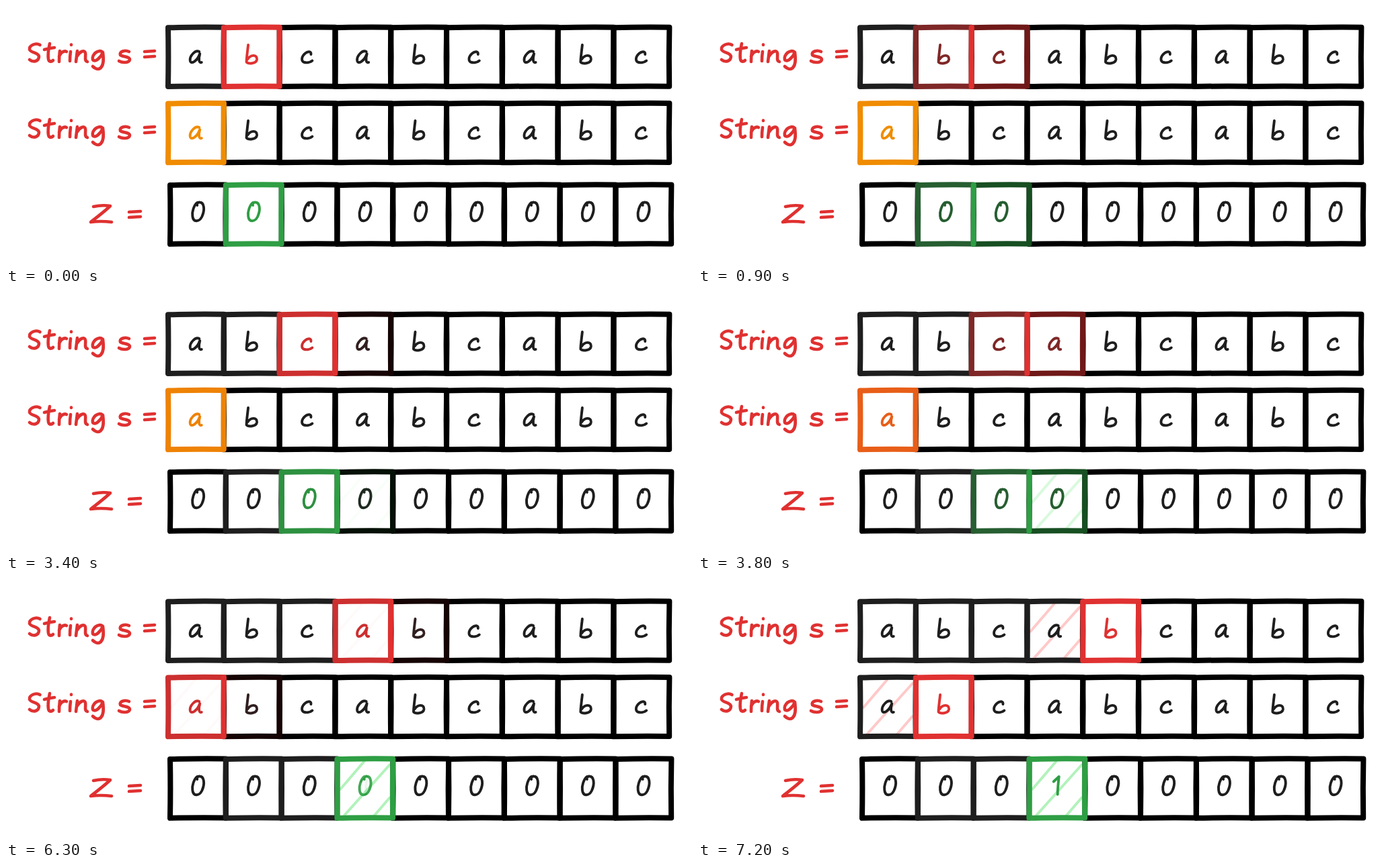
Write an HTML page that moves like this. It is 1020 px wide and 386 px high and loops after 8 s.

```html
<!DOCTYPE html>
<html lang="en">
<head>
<meta charset="utf-8">
<title>Z array step by step</title>
<style>
  html, body { margin: 0; width: 100%; height: 100%; overflow: hidden; background: #fff; }
  svg { display: block; width: 1020px; height: 386px; }
  path { fill: none; stroke-linecap: round; stroke-linejoin: round; }
  text { fill: none; font: 28px "Open Sans", sans-serif; text-anchor: middle; }
</style>
</head>
<body>
<svg id="stage" viewBox="0 0 1020 386"></svg>
<script>
const LOOP = 8000, PITCH = 82.8;
const RED = '#e03131', ORANGE = '#f08c00', GREEN = '#2f9e44';
const BLACK = '#000', GREY = '#1e1e1e', PINK = '#ffc9c9', MINT = '#b2f2bb';

// Handwritten glyphs as pen strokes around the cell's centre.
const GLYPHS = {
  a: 'M5-7.5C-1-10.5-9.5-1-8.5 6C-7.5 12 2 7 6-4.5C4 3 4 10 8.5 8.5',
  b: 'M-5-17.5C-6-8-7.5 2-7.5 8C-5 11 7 11 8 4C8.5-3-1-4-6 4',
  c: 'M5.5-3.5C6.5-8 1-8.5-3-5C-9 0-9.5 7-4 8.5C0 9.5 5 8 7.5 6',
  0: 'M-1-13C-6-9-9 1-8 7C-7 17 2 16 6 8C11-3 9-13 3-13.5C0-14-2-11-1-9',
  1: 'M-5-5.5L3-13C2-4 1 5 1 13.5'
};
const WORD = 'M50.5 59C44 55 34 60 35 66C37 71 48 70 49 76C49 83 41 86 35 81' +
  'M65 57C63 66 62 74 63 80C64 85 68 84 70 82M57 66Q64 64 72 63' +
  'M80 68Q79 76 79 84M79 76C82 70 86 67 90 69' +
  'M96 69Q95 76 95 83M97 58.5L97 59' +
  'M106 68Q105 76 104 84M105 77C110 68 117 66 118 71C119 76 116 83 121 84' +
  'M144 70C137 64 127 74 129 81C132 86 141 78 144 70C145 78 146 88 141 93C137 97 132 94 129 91' +
  'M183 69C177 66 168 69 170 74C173 77 184 76 184 81C183 86 173 86 168 83' +
  'M206 69L221 68M206 77L221 76';
const Z_WORD = 'M130 299Q143 296 155 298C148 305 135 315 126 322Q141 320 157 322' +
  'M183 307L200 306M183 315L200 314';
const BOX = 'M0 .5Q40-.5 83 0Q82 44 82.8 88Q40 87.5 0 88.3Q.8 44 0 .5Z';
const HATCH = 'M5 45L40 4M10 85L78 9M54 86L78 58';

const pen = (d, x, y, color, width) =>
  `<path d="${d}" transform="translate(${x} ${y})" stroke="${color}" stroke-width="${width}"/>`;

const label = (words, d, y, x, baseline) =>
  `<text x="${x}" y="${baseline}">${words}</text>` + pen(d, 0, y, RED, 4.6);

function row(x0, y0, midY, chars, { on, ink, past = [], hatch = {} }) {
  const rank = i => i === on ? 2 : past.includes(i) ? 1 : 0;
  const left = i => x0 + PITCH * i;
  const cells = [...chars].map((char, i) => ({ char, i, rank: rank(i) }));
  const hatches = Object.entries(hatch).map(([i, color]) => pen(HATCH, left(+i), y0, color, 4));
  const boxes = [...cells].sort((p, q) => p.rank - q.rank)
    .map(({ i, rank }) => pen(BOX, left(i), y0, [BLACK, GREY, ink][rank], 8));
  const glyphs = cells.map(({ char, i, rank }) => {
    const x = left(i) + 41.3;
    return `<text x="${x}" y="${midY + 10}">${char}</text>` +
      pen(GLYPHS[char], x, midY, rank === 2 ? ink : GREY, 3.9);
  });
  return [...hatches, ...boxes, ...glyphs].join('');
}

const scene = ({ top, mid, z, counts = '000000000' }) =>
  '<rect width="1020" height="386" fill="#fff"/>' +
  label('String s =', WORD, -1, 128, 83) +
  label('String s =', WORD, 112, 128, 196) +
  label('Z =', Z_WORD, 0, 162, 322) +
  row(241, 31.7, 75.5, 'abcabcabc', top) +
  row(241, 145, 188.5, 'abcabcabc', mid) +
  row(244, 266.5, 306, counts, z);

const scenes = [
  { start: 0,
    top: { on: 1, ink: RED, past: [0] },
    mid: { on: 0, ink: ORANGE },
    z: { on: 1, ink: GREEN } },
  { start: 500,
    top: { on: 2, ink: RED, past: [0, 1] },
    mid: { on: 0, ink: ORANGE },
    z: { on: 2, ink: GREEN, past: [1] } },
  { start: 3400,
    top: { on: 3, ink: RED, past: [0, 1, 2] },
    mid: { on: 0, ink: RED },
    z: { on: 3, ink: GREEN, past: [1, 2], hatch: { 3: MINT } } },
  { start: 6300, counts: '000100000',
    top: { on: 4, ink: RED, past: [0, 1, 2, 3], hatch: { 3: PINK } },
    mid: { on: 1, ink: RED, past: [0], hatch: { 0: PINK } },
    z: { on: 3, ink: GREEN, past: [1, 2], hatch: { 3: MINT } } }
];

const stage = document.getElementById('stage');
stage.innerHTML = scenes.map(s => `<g>${scene(s)}</g>`).join('');

// Each scene fades in over the one before it, a tenth every 100 ms.
scenes.forEach(({ start }, i) => {
  if (!i) return;
  const at = ms => (ms - 1) / LOOP;
  stage.children[i].animate([
    { opacity: 0, offset: 0, easing: 'step-end' },
    { opacity: 0.1, offset: at(start), easing: 'steps(9, end)' },
    { opacity: 1, offset: at(start + 900) },
    { opacity: 1, offset: 1 }
  ], { duration: LOOP, iterations: Infinity });
});
</script>
</body>
</html>
```
